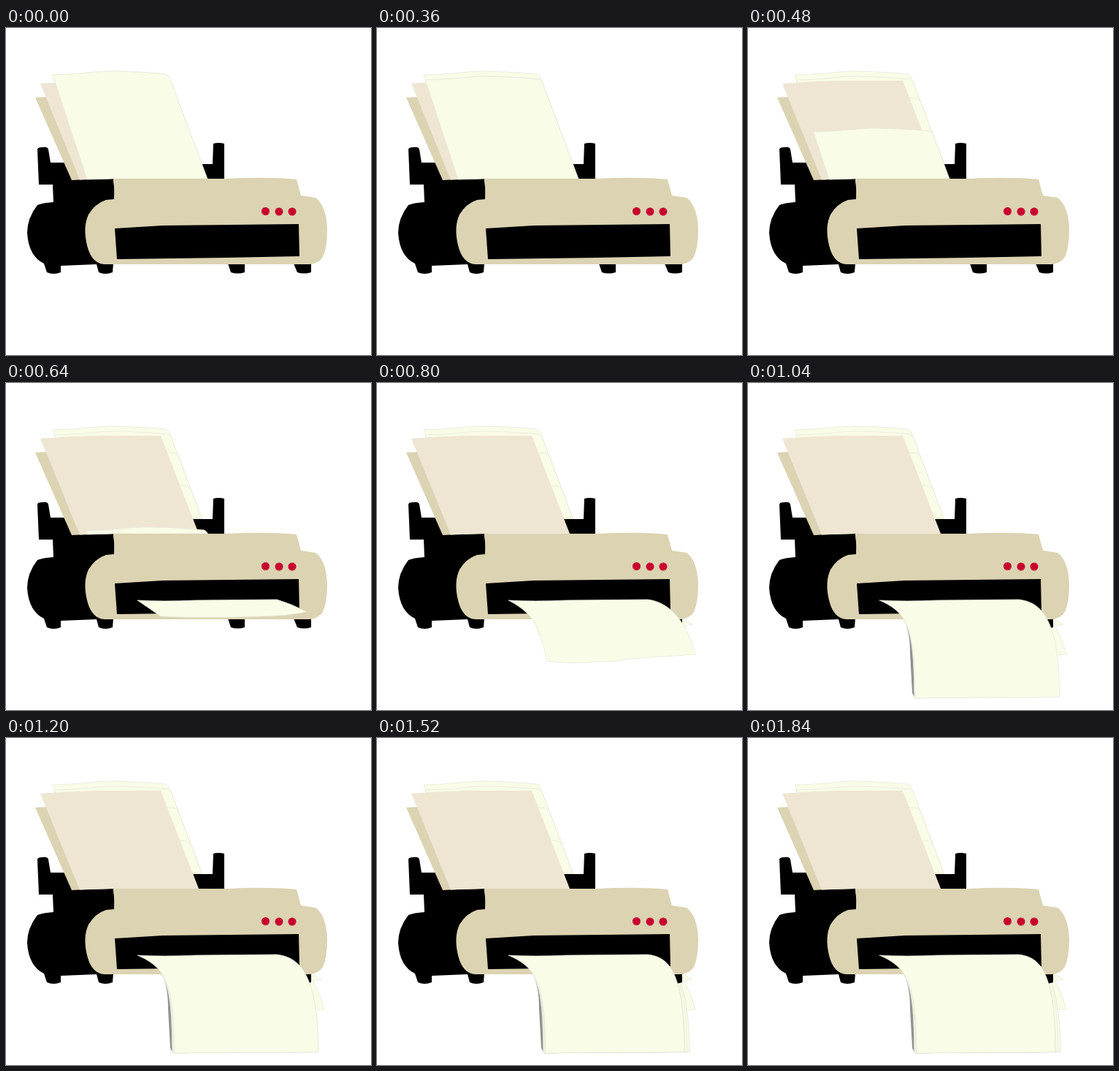
An HTML page with a canvas that plays this animation: 500x447 px, repeating every 2000 ms.

```html
<!DOCTYPE html>
<html lang="en">
<head>
<meta charset="utf-8">
<title>Printer</title>
<style>
html, body { margin: 0; width: 100%; height: 100%; overflow: hidden; background: #fff; }
canvas { display: block; }
</style>
</head>
<body>
<canvas id="stage" width="500" height="447"></canvas>
<script>
const ctx = document.getElementById('stage').getContext('2d');
const LOOP = 2000, STEP = 80;
const BLACK = '#000', TAN = '#dbd3b2', BEIGE = '#eee6d3', CREAM = '#f9fce6';
const EDGE = '#e5e7dc', RED = '#c8002f', GRAY = '#929292';

const shape = d => new Path2D(d);

const frame = shape(`M43 166Q43 163 50 163Q57 162 58 166L61 184H110V207L147 206L150 234V322H147L146 334
  Q136 338 127 334L124 323L75 325V334Q65 338 56 334L52 322Q31 312 29 280Q29 260 43 242Q50 239 65 238L64 214H45Z
  M284 158Q291 156 299 158V207H250V186H283Z
  M304 322L308 334Q317 337 327 334V322ZM394 322L399 334Q408 337 418 334V322Z`);
const front = shape(`M147 206L300 206Q360 203 398 207L404 229L424 232Q439 243 440 275Q440 300 434 313Q428 322 416 323
  H135Q117 322 111 297Q105 272 113 255Q122 240 137 235L148 234Q149 220 147 206Z`);
const slot = shape('M149 274L215 270L401 268L402 312L300 314L152 316Z');
const tanSheet = shape('M40 95L60 94L110 207L90 208Z');
const beigeSheet = shape('M47 76Q80 73 130 72L212 72L264 206H147L101 207.5Z');
const underside = shape('M211 318C220 335 222 350 222 370L225 424L229 431V350Z');

// Sheet sliding down into the feeder by dy
function feedSheet(dy) {
  const x = 64 + dy * .331, y = 64 + dy, right = 222 + dy * .38;
  return shape(`M${x} ${y}C${x + 45} ${y - 1} ${x + 55} ${y - 5} ${x + 85} ${y - 5}
    Q${right - 32} ${y - 4} ${right - 3} ${y - 1}Q${right} ${y} ${right + 2} ${y + 4}L276 206H147L111 207Z`);
}

// Printed sheet leaving the slot; the rest of its outline varies
const printed = outline => shape(`M180 297Q215 299 260 297L371 296${outline}Z`);

// Printed sheet hanging down, given its two lower corners
const hanging = (lx, ly, rx, ry, wave) => printed(`C404 300 ${rx - 1} 325 ${rx} ${ry}
  C${rx - 60} ${ry + wave} ${lx + 70} ${ly - wave} ${lx} ${ly}C${lx - 1} 340 222 315 180 297`);

const feed = [0, 7, 33, 78, 122, 138].map(feedSheet);
const feedStart = 3;
const output = [
  printed('Q392 302 412 313Q380 319 350 319Q275 322 212 319'),
  printed('C395 300 412 320 432 330C400 338 350 346 300 346L222 345C216 325 208 308 180 297'),
  printed('C404 300 425 330 436 371L345 377Q335 381 300 381Q265 385 233 380C224 345 222 318 180 297'),
  hanging(229, 418, 421, 412, 6),
  ...[[228, 424], [229, 427], [230, 428], [231, 428], [231, 425], [231, 422], [231, 420], [231, 421]]
    .map(([left, right]) => hanging(left, 431, right, 429, 2))
];
const outputStart = 8, undersideStart = 13;

function fill(path, color) {
  ctx.fillStyle = color;
  ctx.fill(path);
}

function paper(path) {
  fill(path, CREAM);
  ctx.strokeStyle = EDGE;
  ctx.lineWidth = .7;
  ctx.stroke(path);
}

function draw(now) {
  const step = Math.floor(now % LOOP / STEP);
  const fed = Math.max(0, step - feedStart);
  const out = Math.min(step - outputStart, output.length - 1);
  ctx.fillStyle = '#fff';
  ctx.fillRect(0, 0, 500, 447);

  // Earlier positions of the sheets stay visible around the printer
  if (step >= undersideStart) fill(underside, GRAY);
  output.slice(0, Math.max(0, out)).forEach(paper);
  fill(frame, BLACK);
  ctx.save();
  ctx.beginPath();
  ctx.rect(0, 0, 500, 186);
  ctx.clip();
  feed.slice(0, fed + 1).forEach(paper);
  ctx.restore();

  fill(tanSheet, TAN);
  fill(beigeSheet, BEIGE);
  if (fed < feed.length) paper(feed[fed]);

  fill(front, TAN);
  fill(slot, BLACK);
  for (const [x, y] of [[355.5, 250.5], [374, 251], [392, 251]]) {
    ctx.fillStyle = RED;
    ctx.beginPath();
    ctx.arc(x, y, 5.5, 0, Math.PI * 2);
    ctx.fill();
  }

  if (out >= 0) paper(output[out]);
}

function tick() {
  draw(performance.now());
  requestAnimationFrame(tick);
}
tick();
</script>
</body>
</html>
```
